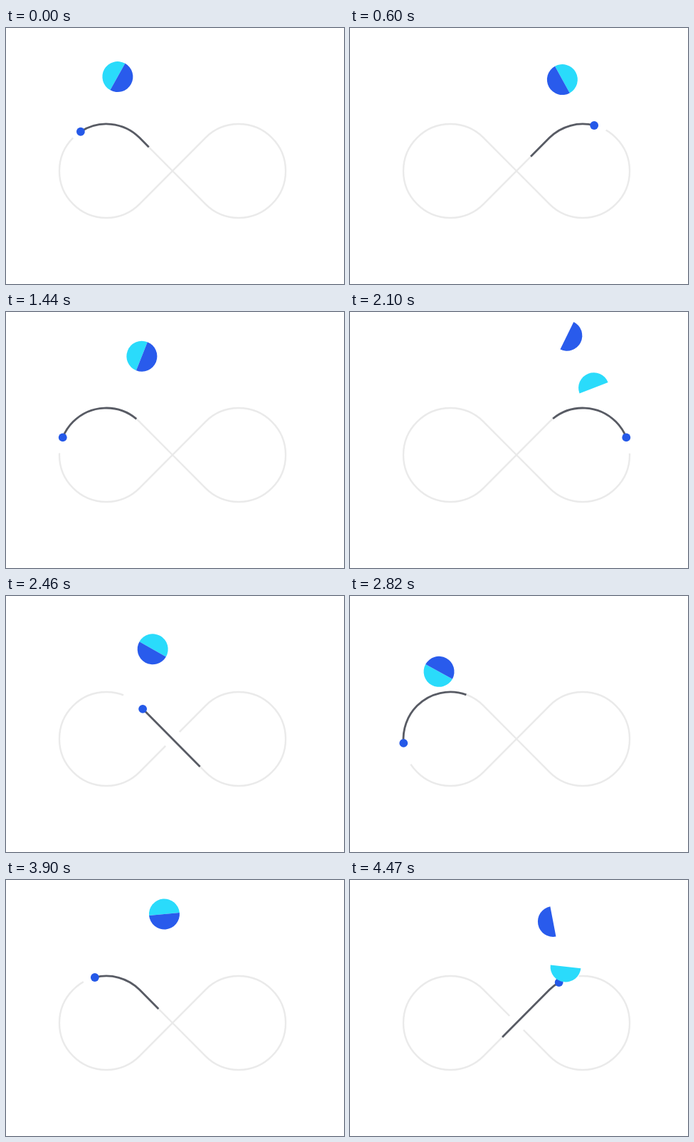
An HTML page for the animation above (4.5 s loop, 475 by 360 pixels).

```html
<!DOCTYPE html>
<html lang="en">
<head>
<meta charset="utf-8">
<title>Infinity juggle</title>
<style>
  html, body { margin: 0; width: 100%; height: 100%; overflow: hidden; background: #fff; }
  svg { display: block; width: 100vw; height: 100vh; }
  .line { fill: none; }
</style>
</head>
<body>
<svg viewBox="0 0 475 360">
  <defs>
    <path id="loop" d="M234 201L187.67 154.33A66 66 0 1 0 187.67 247.67L280.33 154.33A66 66 0 1 1 280.33 247.67Z"/>
  </defs>
  <use href="#loop" class="line" stroke="#eaeaea" stroke-width="2.4"/>
  <use href="#loop" id="clear" class="line" stroke="#fff" stroke-width="28"/>
  <use href="#loop" id="trail" class="line" stroke="#585b64" stroke-width="2.8"/>
  <circle id="dot" r="5.9" fill="#2559e8"/>
  <path id="cyan" fill="#2adbfb" d="M0-21.5A21.5 21.5 0 0 0 0 21.5Z"/>
  <path id="blue" fill="#295bec" d="M0-21.5A21.5 21.5 0 0 1 0 21.5Z"/>
</svg>
<script>
const $ = id => document.getElementById(id);
const loop = $('loop'), total = loop.getTotalLength(), half = total / 2;
const LOOP = 4500, STEP = 30, BEAT = 660, CYCLE = 4 * BEAT;
const { sin, cos, abs, PI } = Math;

const easeOut = (f, n) => 1 - (1 - f) ** n;
const mix = (a, b, f) => a + (b - a) * f;

// Four throws: where each one lands, how high it goes and how far it turns.
// drag slows x, slow eases the turn, peak is the share of time spent rising.
const rest = { t: 197, x: 124, y: 113, angle: 324 };
const flights = [
  { t: 857, x: 345, y: 113, top: 72.3, drag: 1.65, turn: 896 },
  { t: 1570, x: 181, y: 122, top: 46.5, drag: 1.65, turn: 1176 },
  { t: 2177, x: 305, y: 122, top: 33, drag: 3.3, turn: 540, peak: .92, slow: 1.4, split: true },
  { t: rest.t + CYCLE, x: rest.x, y: rest.y, top: 68, drag: 1.41, turn: 988 }
];

function ball(t) {
  let from = rest, i = 0;
  while (t > flights[i].t) {
    from = { ...flights[i], angle: from.angle + flights[i].turn };
    i++;
  }
  const { x, y, top, drag, turn, peak = .664, slow = 1, split, t: end } = flights[i];
  const f = (t - from.t) / (end - from.t);
  const rising = f < peak;
  const drop = (f - peak) / (rising ? peak : 1 - peak);
  return {
    f, split,
    x: mix(from.x, x, easeOut(f, drag)),
    y: mix(top, rising ? from.y : y, drop * drop),
    angle: from.angle + turn * easeOut(f, slow)
  };
}

// The loose half drifts right, bounces low twice and turns ahead
function looseHalf(b) {
  if (!b.split) return b;
  return {
    x: b.x + 48 * sin(PI * b.f ** 2.5),
    y: 122 - 25 * abs(sin(2 * PI * b.f ** .817)),
    angle: b.angle + 110 * sin(PI * b.f)
  };
}

function place(id, { x, y, angle }) {
  $(id).setAttribute('transform', `translate(${x} ${y}) rotate(${angle})`);
}

// Distance along the loop, slowest on top of each circle
function travel(t) {
  const p = (t - 30) / BEAT;
  return 165 + half * (p - .55 * sin(2 * PI * p) / (2 * PI));
}

function dash(id, from, to) {
  const len = to - from;
  $(id).setAttribute('stroke-dasharray', `${len} ${total - len}`);
  $(id).setAttribute('stroke-dashoffset', -(from % total));
}

function draw(t) {
  const head = travel(t);
  const tail = head - 106 - 16 * (1 - cos(2 * PI * (t + 60) / BEAT));
  dash('clear', tail, travel(t + 45));
  dash('trail', tail, head);
  const pos = loop.getPointAtLength(head % total);
  $('dot').setAttribute('cx', pos.x);
  $('dot').setAttribute('cy', pos.y);

  const c = t % CYCLE;
  const b = ball(c < rest.t ? c + CYCLE : c);
  place('blue', b);
  place('cyan', looseHalf(b));
}

const begin = performance.now();
function tick() {
  const t = (performance.now() - begin) % LOOP;
  draw(Math.floor(t / STEP) * STEP);
  requestAnimationFrame(tick);
}
tick();
</script>
</body>
</html>
```
